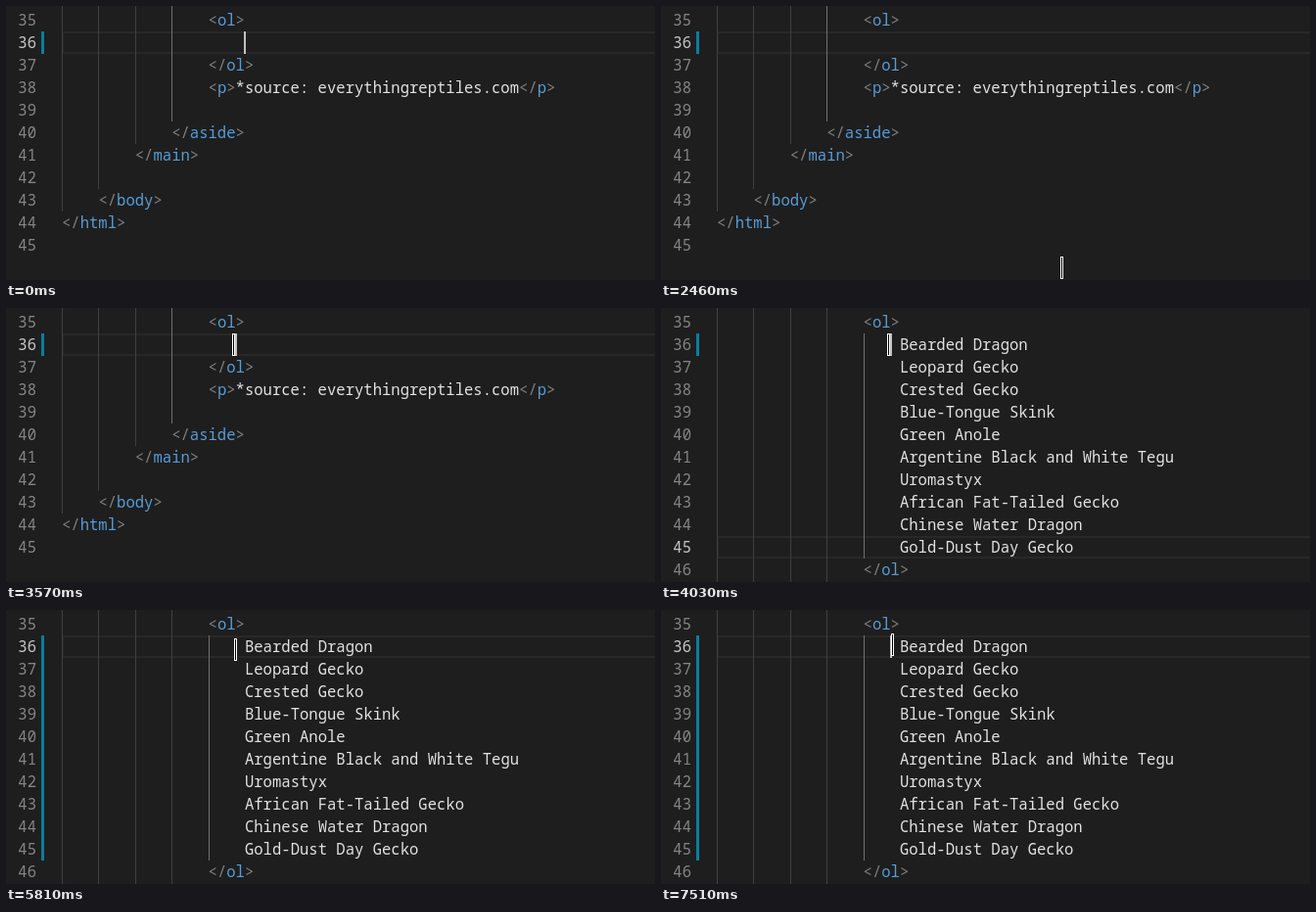
These frames come from a looping animation (663 px wide and 280 px high, 8 s). An HTML page:

```html
<!DOCTYPE html>
<html lang="en">
<head>
<meta charset="utf-8">
<title>Pasting a list in a code editor</title>
<style>
html, body { margin: 0; width: 100%; height: 100%; overflow: hidden; background: #1e1e1e; }
svg { display: block; width: 663px; height: 280px; }
text { font: 500 15.578px "Noto Sans Mono", monospace; fill: #e2e2e2; white-space: pre; }
.num { fill: #858585; text-anchor: end; }
.num.on { fill: #c6c6c6; }
.tag { fill: #569cd6; }
.br { fill: #808080; }
</style>
</head>
<body>
<svg id="stage" viewBox="0 0 663 280" shape-rendering="crispEdges"></svg>
<script>
const LOOP = 8000, TICK = 70, ROW = 23, FIRST = 35, LAST = 46, LEFT = 57, CHAR = 9.347;
const stage = document.getElementById('stage');
const rowTop = n => 3 + (n - FIRST) * ROW;

function set(el, attrs) {
  for (const k in attrs) el.setAttribute(k, attrs[k]);
  return el;
}
function add(parent, name, attrs, text = '') {
  const el = set(document.createElementNS('http://www.w3.org/2000/svg', name), attrs);
  el.textContent = text;
  parent.append(el);
  return el;
}
const group = () => add(stage, 'g', {});
const rect = (parent, x, y, width, height, fill) =>
  add(parent, 'rect', { x, y, width, height, fill });
const show = (el, on) => set(el, { visibility: on ? 'visible' : 'hidden' });

// Draws one line of code, colouring tags and brackets.
function codeLine(parent, n, col, code) {
  const line = add(parent, 'text', { x: LEFT + col * CHAR, y: rowTop(n) + 17 });
  for (const part of code.split(/(<\/?|>)/)) {
    const cls = /[<>]/.test(part) ? 'br' : /^(ol|p|aside|main|body|html)$/.test(part) ? 'tag' : '';
    add(line, 'tspan', { class: cls }, part);
  }
}
function guide(parent, level, from, to, active) {
  const x = Math.round(LEFT + level * 4 * CHAR);
  rect(parent, x, from, 1, to - from, active ? '#707070' : '#404040');
}

const current = add(stage, 'rect',
  { x: LEFT + 1, width: 663, height: ROW - 2, fill: 'none', stroke: '#282828', 'stroke-width': 2 });

const before = group();
[44, 43, 41, 40].forEach((n, level) => guide(before, level, 0, rowTop(n), level === 3));
codeLine(before, 37, 16, '</ol>');
codeLine(before, 38, 16, '<p>*source: everythingreptiles.com</p>');
codeLine(before, 40, 12, '</aside>');
codeLine(before, 41, 8, '</main>');
codeLine(before, 43, 4, '</body>');
codeLine(before, 44, 0, '</html>');

const after = group();
for (let level = 0; level < 4; level++) guide(after, level, 0, 280);
guide(after, 4, rowTop(36), rowTop(46), true);
['Bearded Dragon', 'Leopard Gecko', 'Crested Gecko', 'Blue-Tongue Skink', 'Green Anole',
 'Argentine Black and White Tegu', 'Uromastyx', 'African Fat-Tailed Gecko',
 'Chinese Water Dragon', 'Gold-Dust Day Gecko']
  .forEach((name, i) => codeLine(after, 36 + i, 20, name));
codeLine(after, LAST, 16, '</ol>');

codeLine(stage, FIRST, 16, '<ol>');
const nums = [];
for (let n = FIRST; n <= LAST; n++)
  nums[n] = add(n === LAST ? after : stage, 'text', { class: 'num', x: 31, y: rowTop(n) + 17 }, n);

const mark = rect(stage, 36, rowTop(36), 3, ROW, '#0c7d9d');
const caret = rect(stage, 0, 0, 2, ROW, '#c0c1bf');
const mouse = group();
rect(mouse, 0, 0, 3, ROW, '#fff');
rect(mouse, 1, 1, 1, ROW - 2, '#000');
const halo = add(stage, 'circle',
  { cx: 1, cy: 11, r: 12, fill: '#fff000', 'fill-opacity': 0.5, 'shape-rendering': 'auto' });

const SHOWN = 2460, PASTE = 4030;
const clicks = [3300, 4990, 7240];
const edits = [ // time, line, column of the caret
  [0, 36, 20], [3430, 36, 19], [PASTE, 45, 39], [4990, 36, 19], [7450, 36, 19]
];
const path = [ // time, x, y of the mouse
  [SHOWN, 408, 256], [3300, 231, 26], [5060, 231, 26], [5270, 233, 29], [6280, 233, 29],
  [6560, 253, 29], [6770, 243, 29], [7170, 243, 29], [7310, 235, 24], [LOOP, 235, 24]
];
const clamp = v => Math.max(0, Math.min(1, v));
const held = (track, t) => track.findLast(s => s[0] <= t) || track[0];

function mouseAt(t) {
  const i = Math.max(1, path.findIndex(s => s[0] > t));
  const [[t0, x0, y0], [t1, x1, y1]] = path.slice(i - 1, i + 1);
  const p = clamp(Math.floor((t - t0) / TICK) * TICK / (t1 - t0));
  const e = p * p * (3 - 2 * p);
  return [Math.round(x0 + (x1 - x0) * e), Math.round(y0 + (y1 - y0) * e)];
}

// Smooth blink: three-step fades, restarted by every edit.
function blink(age) {
  const fade = from => clamp((Math.floor((age % 1140 - from) / TICK) + 1) / 3);
  const rise = age < 1140 ? 1 : fade(150);
  return (rise - fade(630)) ** 3;
}

function draw(t) {
  const pasted = t >= PASTE;
  const [since, line] = held(edits, t);
  show(before, !pasted);
  show(after, pasted);
  set(current, { y: rowTop(line) + 1 });
  nums.forEach((el, n) => el.classList.toggle('on', n === line));
  set(mark, { height: t >= PASTE + 200 ? ROW * 10 : ROW });

  // The caret is redrawn one tick after the line highlight.
  const [, row, col] = held(edits, t - 80);
  const opacity = t < 3510 ? +(t < TICK) : blink(t - since);
  set(caret, { x: Math.floor(LEFT + col * CHAR), y: rowTop(row), opacity });

  const transform = `translate(${mouseAt(t)})`;
  set(mouse, { transform });
  set(halo, { transform });
  show(mouse, t >= SHOWN);
  show(halo, clicks.some(c => t >= c && t < c + 270));
}

const start = performance.now();
function tick() {
  draw((performance.now() - start) % LOOP);
  requestAnimationFrame(tick);
}
tick();
</script>
</body>
</html>
```
